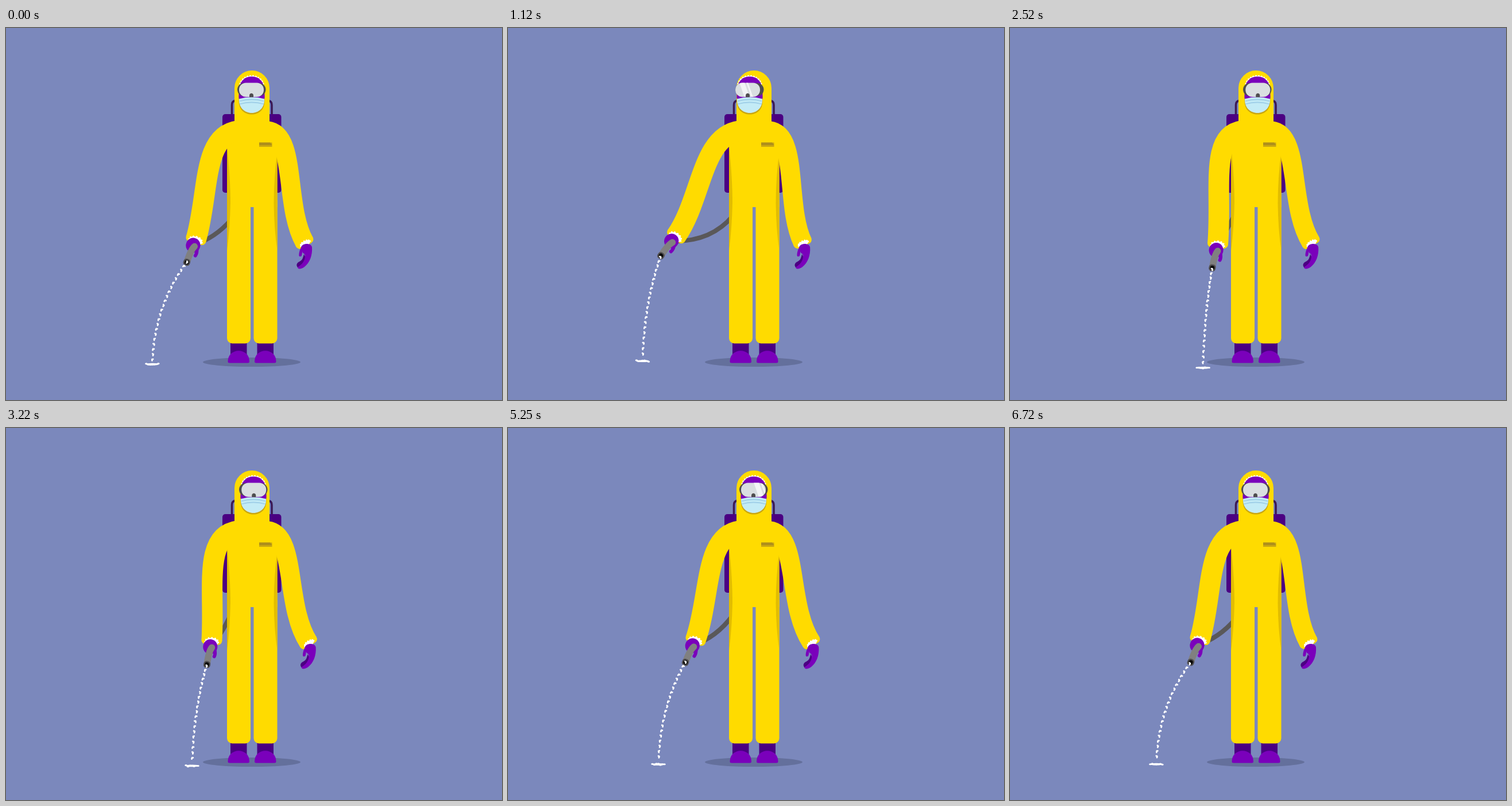
Write an HTML page with a canvas that moves like this. It is 864 px wide and 648 px high and loops after 6.79 s.

```html
<!DOCTYPE html>
<html lang="en">
<head>
<meta charset="utf-8">
<title>Disinfection</title>
<style>
html, body { margin: 0; width: 100%; height: 100%; overflow: hidden; background: #7b88bc; }
canvas { display: block; }
</style>
</head>
<body>
<canvas id="stage" width="864" height="648"></canvas>
<script>
const ctx = document.getElementById('stage').getContext('2d');
const STEP = 70, STEPS = 97;
const C = {
  bg: '#7b88bc', shadow: '#64709c', suit: '#ffdb00', shade: '#e2bd00', edge: '#c9a613',
  badge: '#ad8e1c', purple: '#7a00bb', dark: '#4b0082', handle: '#3b1a57', hose: '#5a5859',
  pipe: '#808080', rim: '#4f4d4f', lens: '#d9dee1', glare: '#f2f4f6', mask: '#c3ebf6', fold: '#9fcfe8'
};

// Turning points as [step, value], eased in between
function ease(f, ...keys) {
  let i = 0;
  while (i < keys.length - 2 && f > keys[i + 1][0]) i++;
  const [[f0, a], [f1, b]] = keys.slice(i);
  const u = Math.min(1, Math.max(0, (f - f0) / (f1 - f0)));
  return a + (b - a) * u * u * (3 - 2 * u);
}

// The wrist drives the arm, the nozzle, the hose and the splash
function pose(f) {
  const x = ease(f, [0, 331], [16, 293], [33, 362], [44, 362], [56, 314], [64, 322], [85, 331]);
  const y = ease(f, [0, 368], [16, 362], [25, 383], [46, 370], [96, 368]);
  const out = x - 328, drop = y - 369;
  const shoulder = [342 + drop * 0.7, 188];
  const elbow = [x + 26 - out * 0.7 + drop * 0.8, y - 78 - out * 0.4];
  const arm = Math.atan2(elbow[0] - x, y - elbow[1]);
  const hand = [x - Math.sin(arm) * 11 - 2, y + Math.cos(arm) * 11];
  const aim = arm + (4 + out * 0.1) * Math.PI / 180, reach = 31.5;
  const nozzle = [hand[0] - Math.sin(aim) * reach, hand[1] + Math.cos(aim) * reach];
  const throwX = ease(f, [0, -60], [16, -32], [25, -5], [46, -26], [96, -60]);
  return {
    wrist: [x, y], shoulder, elbow, hand, aim, reach, nozzle,
    splash: [nozzle[0] + throwX, 586 + drop * 0.55 + out * 0.06],
    hoseY: 327 + 10 * Math.abs(1 - 2 * f / STEPS) ** 3,
    sway: ease(f, [0, 0], [21, -8], [43, 8], [56, -2], [72, 9], [90, 0]),
    turn: ease(f, [0, 0], [16, -7], [25, 3], [46, 3], [57, 0])
  };
}

function rand(n) {
  const s = Math.sin(n * 127.1 + 11.7) * 43758.5453;
  return s - Math.floor(s);
}

function oval(x, y, rx, ry, color) {
  ctx.beginPath();
  ctx.ellipse(x, y, rx, ry, 0, 0, Math.PI * 2);
  ctx.fillStyle = color;
  ctx.fill();
}
function box(x, y, w, h, r, color) {
  ctx.beginPath();
  ctx.roundRect(x, y, w, h, r);
  ctx.fillStyle = color;
  ctx.fill();
}
function shape(d, color) {
  ctx.fillStyle = color;
  ctx.fill(new Path2D(d));
}
function line(d, color, width, cap = 'butt') {
  ctx.strokeStyle = color;
  ctx.lineWidth = width;
  ctx.lineCap = cap;
  ctx.stroke(new Path2D(d));
}
function placed(x, y, angle, paint) {
  ctx.save();
  ctx.translate(x, y);
  ctx.rotate(angle);
  paint();
  ctx.restore();
}

// White edge with a scalloped upper half
function frill(x, y, rx, ry, count) {
  oval(x, y, rx, ry, '#fff');
  for (let i = 0; i <= count; i++) {
    const a = Math.PI * (1 + i / count);
    oval(x + rx * Math.cos(a), y + ry * Math.sin(a), 1.6, 1.6, '#fff');
  }
}

function sleeve(start, c1, c2, end, width, rx, ry) {
  line(`M${start} C${c1} ${c2} ${end}`, C.suit, width);
  placed(end[0], end[1], Math.atan2(c2[0] - end[0], end[1] - c2[1]), () => {
    const w = width / 2 - 7;
    line(`M${-w} 0 H${w}`, C.suit, 14, 'round');
    frill(0, 3, rx, ry, 6);
  });
}

function backdrop() {
  ctx.fillStyle = C.bg;
  ctx.fillRect(0, 0, 864, 648);
  oval(428, 582, 85, 8, C.shadow);
  line('M393.5 152 V134 Q393.5 126.5 401 126.5', C.handle, 3.6);
  line('M463 152 V134 Q463 126.5 455.5 126.5', C.handle, 3.6);
  box(377, 150, 102.5, 137, 5, C.dark);
}

function hose({ hand: [x, y], hoseY }) {
  const bend = 366 + (378 - y) * 1.1;
  line(`M392 ${hoseY - 3} Q${365 + (x - 326) * 0.3} ${bend} ${x} ${y}`, C.hose, 8);
}

function body() {
  box(385, 178, 87.5, 134, 0, C.suit);
  for (const x of [385, 431.5]) {
    box(x + 6, 545, 28.5, 30, 0, C.dark);
    placed(x + 1.5, 0, 0, () =>
      shape('M0 581 C0 556 37.5 556 37.5 581 Q37.5 583.5 34.5 583.5 H3 Q0 583.5 0 581Z', C.purple));
    box(x, 300, 41, 249.5, [0, 0, 9, 9], C.suit);
  }
  box(420, 300, 16, 12, 0, C.suit);
  box(398, 74, 61, 112, [30.5, 30.5, 0, 0], C.suit);
  shape('M385 205 Q391 262 391 305 Q390 350 385 388Z', C.shade);
  shape('M472.5 215 Q466.5 262 466.5 305 Q467 350 472.5 388Z', C.shade);
}

function badge() {
  box(441, 199.5, 22.5, 7.5, 0, C.edge);
  shape('M441 199.5 H460 L463.5 204 H441Z', C.badge);
}

function face() {
  frill(428, 101, 20.5, 17.5, 13);
  oval(428, 102, 20.5, 17.5, C.purple);
  shape('M405.5 118 H450.5 V127 C450.5 143 440 150.5 428 150.5 C416 150.5 405.5 143 405.5 127Z', C.edge);
  box(405.5, 112, 45, 12, 2, C.purple);
  shape('M406 123.5 Q428 117 450 123.5 C451 139 440 148 428 148 C416 148 405 139 406 123.5Z', C.mask);
  line('M406.5 127.5 Q428 121.5 449.5 127.5 M407 132.5 Q428 126.5 449 132.5', C.fold, 1.8);
  box(403, 96, 49.5, 22.5, 12, C.rim);
}

function goggles(f) {
  ctx.save();
  box(406, 95.5, 43, 24.5, 12, C.lens);
  ctx.clip();
  const x = f < 50 ? 422 + (f - 16) * 2.2 : 413 + (f - 62) * 1.85;
  shape(`M${x - 9} 95 h9 l9 26 h-9Z M${x + 3} 95 h3 l9 26 h-3Z`, C.glare);
  ctx.restore();
  shape('M424 120.5 V117.5 C424 112.5 431 112.5 431 117.5 V120.5Z', C.rim);
}

function rightArm({ sway }) {
  sleeve([455, 179], [507, 185], [484 + sway * 0.2, 309], [520 + sway, 373], 33.5, 9, 4.5);
  placed(sway, 0, 0, () => {
    shape('M509 418 C504 413 507 409 511 407 C517 404 517 400 519 394 L524 404 L514 417Z', C.dark);
    shape('M514 382 C516 374 532 374 533 382 C534 396 529 409 520 416 C515 420 509 421 508 417 C511 414 520 410 521 398 Q521 393 517 392Z', C.purple);
    line('M516.5 383 Q513 389 512.8 395.5', C.purple, 5, 'round');
  });
}

function leftArm({ wrist, shoulder, elbow, hand, aim, reach }) {
  sleeve([404, 179], shoulder, elbow, wrist, 36, 11.5, 7.5);
  placed(hand[0], hand[1], aim, () => {
    oval(0, 0, 12.5, 13, C.purple);
    line('M8 3 Q11.5 10 10 15.5', C.purple, 6, 'round');
    line(`M3 1 Q-1 8 0 ${reach - 2}`, C.pipe, 11.5, 'round');
    box(-6, reach - 6, 12, 12, 5, C.rim);
    oval(0, reach, 3.8, 3.8, '#080808');
  });
}

function spray(f, { nozzle: [ax, ay], splash: [bx, by] }) {
  const cx = bx + 3, cy = (ay + by) / 2 - 12;
  const gap = 8.6 / Math.hypot(bx - ax, by - ay);
  const shift = f * 0.4, phase = shift % 1;
  const mix = (a, b, t) => a + (b - a) * t;
  for (let i = 0; (i + phase) * gap <= 0.98; i++) {
    const t = (i + phase) * gap, id = i - Math.floor(shift) + 200;
    const x0 = mix(ax, cx, t), y0 = mix(ay, cy, t);
    const x1 = mix(cx, bx, t), y1 = mix(cy, by, t);
    const side = id % 2 ? 0.7 : -0.7;
    const tilt = Math.atan2(y1 - y0, x1 - x0) + (rand(id) - 0.5) * 0.7;
    placed(mix(x0, x1, t), mix(y0, y1, t), tilt, () => {
      oval(0, side, 2.7, 1.5, '#fff');
      oval(-1.5, -side * 1.5, 1.4, 1.3, '#fff');
    });
  }
  oval(bx, by, 11.5, 1.9, '#fff');
  for (let i = -3; i <= 3; i++) {
    oval(bx + i * 3.5, by + (rand(i + f * 9) - 0.5) * 2.6, 2.3, 1.5, '#fff');
  }
}

function draw() {
  const f = Math.floor(performance.now() / STEP) % STEPS;
  const p = pose(f);
  backdrop();
  hose(p);
  body();
  rightArm(p);
  leftArm(p);
  badge();
  placed(p.turn, 0, 0, face);
  placed(p.turn * 1.42, 0, 0, () => goggles(f));
  spray(f, p);
}

function loop() {
  draw();
  requestAnimationFrame(loop);
}
loop();
</script>
</body>
</html>
```
